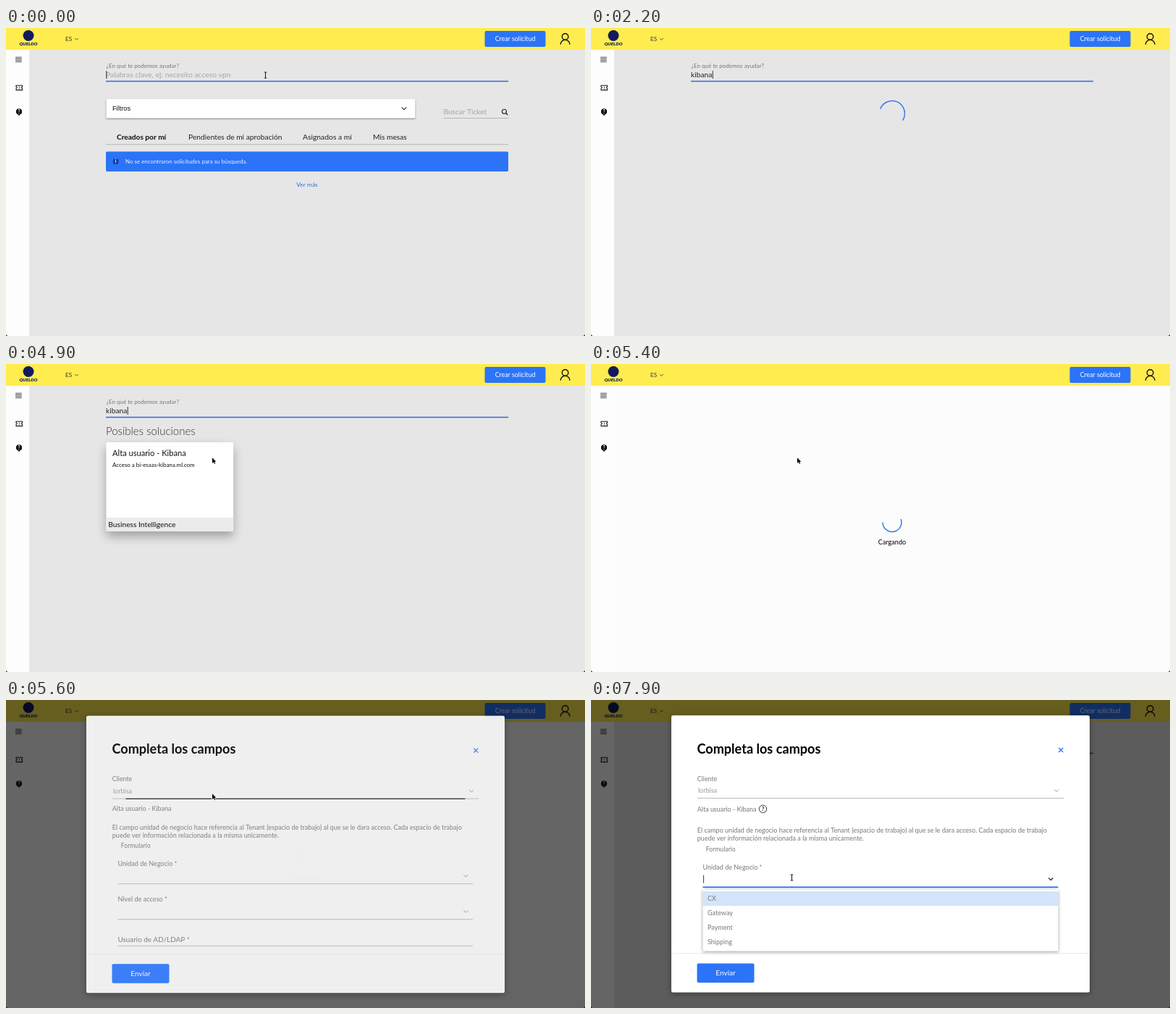
An HTML page with a canvas that plays this animation: 800 by 425 pixels, repeating every 8 s.

```html
<!DOCTYPE html>
<html lang="es">
<head>
<meta charset="utf-8">
<title>Mesa de ayuda</title>
<style>
  html, body { margin: 0; width: 100%; height: 100%; overflow: hidden; background: #e6e6e6; }
  canvas { display: block; width: 800px; height: 425px; }
</style>
</head>
<body>
<canvas id="stage"></canvas>
<script>
const W = 800, H = 425, LOOP = 8000, STEP = 100;
const BLUE = '#2b74f8', LINE = '#2f6bd3', NAVY = '#111a5c', INK = '#222', GREY = '#777';
const canvas = document.getElementById('stage');
const ctx = canvas.getContext('2d');
const dpr = window.devicePixelRatio || 1;
canvas.width = W * dpr;
canvas.height = H * dpr;
ctx.scale(dpr, dpr);

const ramp = (t, a, b) => Math.min(1, Math.max(0, (t - a) / (b - a)));
const ease = p => p * p * (3 - 2 * p);
const mix = (a, b, p) => a + (b - a) * p;

// y is the visual middle of the line
function text(s, x, y, size, color = INK, { weight = 400, align = 'left', font = 'Lato', style = '' } = {}) {
  ctx.font = `${style} ${weight} ${size}px ${font}, sans-serif`;
  ctx.textAlign = align;
  ctx.fillStyle = color;
  ctx.fillText(s, x, y + size * 0.34);
}

function box(x, y, w, h, color, r = 0) {
  ctx.fillStyle = color;
  ctx.beginPath();
  ctx.roundRect(x, y, w, h, r);
  ctx.fill();
}

function path(points, color, width = 1) {
  ctx.strokeStyle = color;
  ctx.lineWidth = width;
  ctx.beginPath();
  points.forEach(([x, y], i) => i ? ctx.lineTo(x, y) : ctx.moveTo(x, y));
  ctx.stroke();
}

function disc(x, y, r, color) {
  ctx.fillStyle = color;
  ctx.beginPath();
  ctx.arc(x, y, r, 0, Math.PI * 2);
  ctx.fill();
}

function ring(x, y, r, color, width) {
  ctx.strokeStyle = color;
  ctx.lineWidth = width;
  ctx.beginPath();
  ctx.arc(x, y, r, 0, Math.PI * 2);
  ctx.stroke();
}

const hline = (x1, x2, y, color, width = 1) => path([[x1, y], [x2, y]], color, width);
const chevron = (x, y, r, color, width = 1) =>
  path([[x - r, y - r / 2], [x, y + r / 2], [x + r, y - r / 2]], color, width);

function fade(alpha, draw) {
  if (alpha <= 0) return;
  ctx.save();
  ctx.globalAlpha = alpha;
  draw();
  ctx.restore();
}

function shadowed(color, blur, dy, draw) {
  ctx.save();
  ctx.shadowColor = color;
  ctx.shadowBlur = blur * dpr;
  ctx.shadowOffsetY = dy * dpr;
  draw();
  ctx.restore();
}

function spinner(x, y, r, from, sweep, squash = 1) {
  const a = from * Math.PI / 180;
  ctx.strokeStyle = '#3a7bea';
  ctx.lineWidth = 1.5;
  ctx.beginPath();
  ctx.ellipse(x, y, r, r * squash, 0, a, a + sweep * Math.PI / 180);
  ctx.stroke();
}

function header() {
  box(0, 0, W, 30, '#ffec4f');
  disc(31, 10.5, 7.5, NAVY);
  text('QUELDO', 31, 22, 6.3, NAVY, { weight: 900, align: 'center', style: 'italic' });
  text('ES', 82, 15, 8.1, '#333');
  chevron(97.5, 15.3, 2.3, '#444', 0.9);
  box(661.5, 4, 84, 22, BLUE, 2);
  text('Crear solicitud', 703.5, 15, 8.8, '#fff', { align: 'center' });
  ring(772.6, 12, 4.3, '#111', 1.4);
  ctx.beginPath();
  ctx.arc(772.6, 22.8, 6.4, Math.PI, 0);
  ctx.stroke();
}

function sidebar() {
  box(0, 30, 32, H - 30, '#fdfdfd');
  for (let i = 0; i < 4; i++) hline(13, 21.7, 40.4 + i * 2.1, '#333', 0.9);
  ctx.strokeStyle = '#222';
  ctx.lineWidth = 1.1;
  ctx.beginPath();
  ctx.moveTo(14, 79.3);
  ctx.lineTo(22.6, 79.3);
  ctx.lineTo(22.6, 81);
  ctx.arc(22.6, 82.3, 1.2, -Math.PI / 2, Math.PI / 2, true);
  ctx.lineTo(22.6, 85.6);
  ctx.lineTo(14, 85.6);
  ctx.lineTo(14, 83.5);
  ctx.arc(14, 82.3, 1.2, Math.PI / 2, -Math.PI / 2, true);
  ctx.closePath();
  ctx.stroke();
  for (let i = 0; i < 3; i++) box(17.8, 80.4 + i * 1.6, 1, 1, '#222');
  disc(18, 115.4, 4.1, '#111');
  path([[18, 117], [18, 120.8]], '#111', 1.6);
  text('?', 18, 115.5, 6.5, '#fff', { weight: 700, align: 'center' });
}

function caret(x, y) {
  path([[x, y - 5.5], [x, y + 5.5]], '#222', 0.9);
}

function search(t) {
  const typed = 'kibana'.slice(0, [300, 600, 900, 1200, 1400, 1700].filter(k => t >= k).length);
  text('¿En qué te podemos ayudar?', 138.5, 52, 8, GREY);
  if (typed) text(typed, 138, 64.7, 10.3);
  else text('Palabras clave, ej: necesito acceso vpn', 138, 64.7, 10.35, '#a6a6a6');
  hline(138, 694, 73.5, LINE, 1.5);
  const blink = t < 1900 || Math.floor((t - 1900) / 500) % 2 === 0;
  if (blink && t < 5000) {
    ctx.font = '400 10.3px Lato, sans-serif';
    caret(138.8 + ctx.measureText(typed).width, 64.5);
  }
}

function tickets() {
  shadowed('rgba(0,0,0,.45)', 2, 1, () => box(138.5, 98, 427, 26.5, '#fff', 1));
  text('Filtros', 147, 111, 9.2, '#111', { font: '"Liberation Sans"' });
  chevron(550, 111, 3.3, '#333', 1.1);
  text('Buscar Ticket', 604.5, 115.8, 10.15, '#a3a3a3');
  hline(604.5, 694, 124.5, '#aaa', 0.8);
  ring(688.4, 115.2, 3, '#222', 1.1);
  path([[690.5, 117.3], [693.2, 120]], '#222', 1.3);
  text('Creados por mí', 153, 150.2, 10.15, '#111', { weight: 700 });
  text('Pendientes de mi aprobación', 252, 150.2, 10.25);
  text('Asignados a mí', 410, 150.2, 10.35);
  text('Mis mesas', 507, 150.2, 10.25);
  hline(138, 694, 160.7, '#b5b5b5');
  box(138, 170.5, 556, 27.5, BLUE, 2);
  box(147.8, 180.2, 7.6, 7.6, '#173f9e', 2.6);
  text('i', 151.6, 184, 6.5, '#fff', { weight: 700, align: 'center' });
  text('No se encontraron solicitudes para su búsqueda.', 165, 184.2, 7.95, '#e9f0ff');
  text('Ver más', 416, 216, 8.4, '#2a6fe0', { align: 'center' });
}

function results(hover) {
  text('Posibles soluciones', 138, 93, 15, '#333', { weight: 300 });
  shadowed(`rgba(0,0,0,${mix(0.25, 0.3, hover)})`, mix(2, 14, hover), mix(0.6, 7, hover),
    () => box(138.5, 108, 175.7, 123, '#fff', 2));
  box(138.5, 212, 175.7, 19, '#ebebeb', [0, 0, 2, 2]);
  text('Alta usuario - Kibana', 147, 123.2, 11.15, '#111');
  text('Acceso a bi-esaas-kibana.ml.com', 147, 139.2, 7.95, '#111');
  text('Business Intelligence', 141.3, 222, 10.25, '#111');
}

function loading(t) {
  box(32, 30, W - 32, H - 30, '#fcfcfc');
  spinner(416, 218.5, 13, -20 + (t - 5400) * 0.36, 200);
  text('Cargando', 416, 246, 9.05, '#111', { weight: 500, align: 'center' });
}

function field(label, y, size, shift) {
  text(label, 154.5, y + shift, size, GREY);
}

function modal(t) {
  const s = t >= 5800 ? 5 : 0;
  const focus = ease(ramp(t, 7100, 7500));
  shadowed('rgba(0,0,0,.35)', 8, 2, () => box(111, 21.2, 578, 382.4, '#fff', 2.5));
  text('Completa los campos', 146.5, 67.6, 18.1, '#000', { weight: 700 });
  path([[646.2, 66], [652.2, 72]], BLUE, 1.3);
  path([[652.2, 66], [646.2, 72]], BLUE, 1.3);

  text('Cliente', 146.8, 108.5, 8.85, GREY);
  text('lorbisa', 148, 125, 9, '#999');
  chevron(643.2, 125, 3.1, '#999', 1);
  hline(147, 653, 135.5, '#b9b9b9', 1);
  const trace = 1 - ramp(t, 5600, 6000);
  const half = 252 * ramp(t, 5400, 5615);
  fade(trace, () => hline(400 - half, 400 + half, 135.8, '#333', 1.2));

  text('Alta usuario - Kibana', 146.8, 149 + s * 0.48, 8.95, GREY);
  if (s) {
    ring(237.5, 150.3, 5.2, '#333', 1);
    text('?', 237.5, 150.5, 8, '#333', { weight: 700, align: 'center' });
  }

  ctx.save();
  ctx.beginPath();
  ctx.rect(111, 160, 578, 189);
  ctx.clip();
  text('El campo unidad de negocio hace referencia al Tenant (espacio de trabajo) al que se le dara acceso. Cada espacio de trabajo',
    146.8, 174.8 + s, 9.02, GREY);
  text('puede ver información relacionada a la misma unicamente.', 146.8, 185.8 + s, 9.02, GREY);
  text('Formulario', 158.8, 200.9 + s, 8.6, GREY);
  field('Unidad de Negocio *', 225.7, 9.05, s);
  chevron(635.3, 242 + s, 3.1, focus ? '#333' : '#999', focus ? 1.4 : 1);
  hline(154.5, 645, 253 + s, '#b9b9b9', 1);
  if (focus) {
    hline(400 - 245.5 * focus, 400 + 245.5 * focus, 253.3 + s, BLUE, 1.7);
    caret(155.6, 242.2 + s);
  }
  field('Nivel de acceso *', 274.7, 9.15, s);
  chevron(635.3, 291 + s, 3.1, '#999', 1);
  hline(154.5, 645, 302 + s, '#b9b9b9', 1);
  field('Usuario de AD/LDAP *', 330.3, 9.9, s);
  hline(154.5, 645, 338.7 + s, '#b9b9b9', 1);
  ctx.restore();

  hline(111, 689, 349.7, '#e8e8e8', 1);
  box(146.5, 363.5, 79, 26.6, BLUE, 2);
  text('Enviar', 186, 377, 10, '#fff', { align: 'center' });
}

function dropdown() {
  shadowed('rgba(0,0,0,.4)', 4, 1, () => box(154.5, 262, 491, 84.5, '#fff', 1));
  box(154.5, 264, 491, 20, '#d4e4fb');
  ['CX', 'Gateway', 'Payment', 'Shipping'].forEach((s, i) => text(s, 161, 274 + i * 20, 9, GREY));
}

function ibeam(x, y) {
  path([[x, y - 4], [x, y + 4]], '#111', 1);
  for (const d of [-4, 4]) hline(x - 1.8, x + 1.8, y + d, '#111', 0.9);
}

function arrow(x, y) {
  ctx.beginPath();
  [[0, 0], [0, 7.6], [1.8, 6], [3, 8.7], [4.2, 8.1], [3, 5.6], [5.2, 5.4]]
    .forEach(([dx, dy]) => ctx.lineTo(x + dx, y + dy));
  ctx.closePath();
  ctx.strokeStyle = '#fff';
  ctx.lineWidth = 1.2;
  ctx.stroke();
  ctx.fillStyle = '#000';
  ctx.fill();
}

function pointer(t) {
  if (t >= 300 && t < 3700) return;
  const a = ease(ramp(t, 3600, 4200)), b = ease(ramp(t, 6500, 6900));
  const x = mix(mix(358.5, 285, a), 277.5, b);
  const y = mix(mix(65, 129.3, a), 245, b);
  if (y < 75 || y > 235) ibeam(x, y);
  else arrow(x, y);
}

function corners() {
  ctx.fillStyle = '#111';
  for (const [x, d] of [[0, 1], [W, -1]]) {
    ctx.beginPath();
    ctx.moveTo(x, H - 3.5);
    ctx.quadraticCurveTo(x, H, x + 3.5 * d, H);
    ctx.lineTo(x, H);
    ctx.fill();
  }
}

function draw(t) {
  box(0, 0, W, H, '#e6e6e6');
  header();
  sidebar();
  search(t);
  if (t < 500) tickets();
  const swap = ramp(t, 2850, 3550);
  if (t >= 500 && swap < 1) {
    const k = 1 - ramp(t, 2800, 3500);
    if (k > 0) spinner(416, mix(59, 118, k), 17.5, 165 + (t - 1100) * 0.36, 192, k);
  }
  fade(swap, () => results(ease(ramp(t, 3900, 4400))));
  const wait = ramp(t, 4900, 5100) * (1 - ramp(t, 5600, 5900));
  fade(wait, () => loading(t));

  const open = ramp(t, 5430, 5615);
  if (open > 0) {
    fade(0.6 * ramp(t, 5400, 5600), () => box(0, 0, W, H, '#000'));
    fade(open, () => {
      ctx.translate(0, 8 * (1 - open));
      modal(t);
    });
    fade(ramp(t, 7620, 7880), dropdown);
  }
  pointer(t);
  corners();
}

function tick(now) {
  draw(Math.floor((now % LOOP) / STEP) * STEP);
  requestAnimationFrame(tick);
}
requestAnimationFrame(tick);
</script>
</body>
</html>
```
